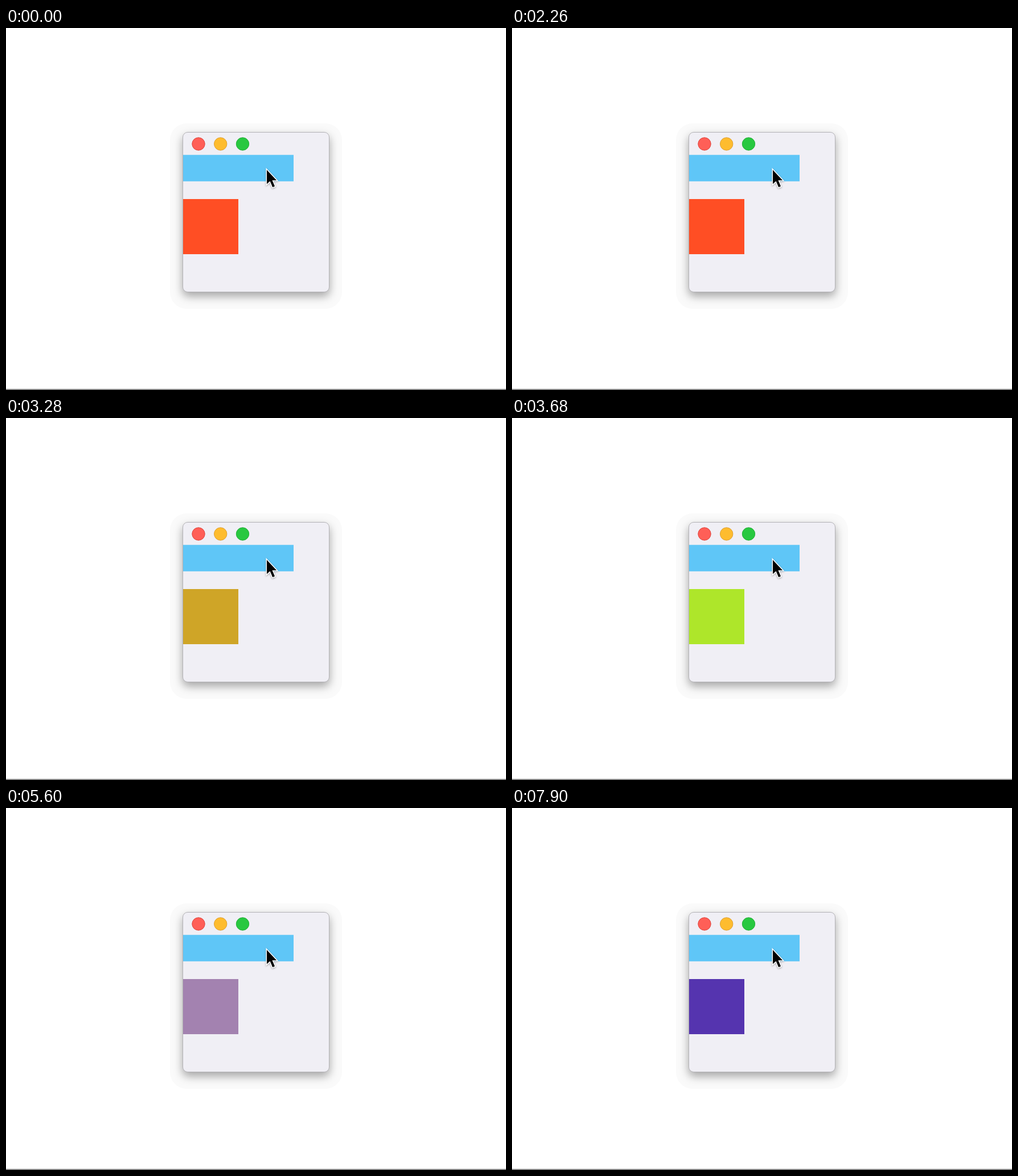
An HTML page for the animation above (8000 ms loop, 878x637 px).

```html
<!DOCTYPE html>
<html lang="en">
<head>
<meta charset="utf-8">
<title>Window with a press bar and a colour square</title>
<style>
  html, body { margin: 0; width: 100%; height: 100%; overflow: hidden; background: #fff; }
  svg { display: block; width: 878px; height: 637px; }
  .window { filter: drop-shadow(0 7px 8px rgba(0, 0, 0, .34)); }
  .cursor { filter: drop-shadow(0 1.5px 1.5px rgba(0, 0, 0, .35)); }
</style>
</head>
<body>
<svg viewBox="0 0 878 637">
  <rect y="635" width="878" height="2" fill="#8c8c8c"/>
  <rect x="288" y="168" width="302" height="326" rx="29" fill="#fafafa"/>
  <rect class="window" x="310.5" y="183.5" width="257" height="281" rx="8.5" fill="#f0eff5" stroke="#b2b1b5"/>
  <g>
    <circle cx="338" cy="204" r="11.2" fill="#ff5f57" stroke="#e0443e"/>
    <circle cx="376.7" cy="204" r="11.2" fill="#febc2e" stroke="#dea034"/>
    <circle cx="415.5" cy="204" r="11.2" fill="#28c840" stroke="#24ae38"/>
  </g>
  <rect id="bar" x="311" y="223.3" width="194" height="46.5" fill="#5fc6f7"/>
  <rect id="square" x="311" y="301" width="97" height="97" fill="#ff4e24"/>
  <path class="cursor" d="M458 249.8V274.6L463.6 269.4 468.2 280.2 472 278.6 467.5 268H475Z"
        fill="#000" stroke="#fff" stroke-width="3" paint-order="stroke"/>
</svg>
<script>
  const LOOP = 8000;
  const IDLE = '#5fc6f7', PRESSED = '#107eff';
  const RED = '#ff4e24', ORANGE = '#ef6424', LIME = '#aee62a';
  const LILAC = '#a065d6', INDIGO = '#5534af';

  // Each row: time in ms, fill, and the easing towards the next row (held by default).
  function play(id, rows) {
    const keyframes = rows.map(([time, fill, easing = 'step-end']) =>
      ({ offset: time / LOOP, fill, easing }));
    const animation = document.getElementById(id)
      .animate(keyframes, { duration: LOOP, iterations: Infinity });
    animation.startTime = document.timeline.currentTime;
  }

  play('bar', [
    [0, IDLE],
    [1300, PRESSED], [2260, IDLE],
    [4080, PRESSED], [4480, IDLE],
    [6320, PRESSED], [6700, IDLE],
    [LOOP, IDLE]
  ]);

  play('square', [
    [0, RED],
    [3100, ORANGE, 'steps(6, jump-end)'],
    [3460, LIME],
    [5320, LIME, 'steps(9, jump-start)'],
    [5725, LILAC],
    [7600, LILAC, 'steps(4, jump-start)'],
    [LOOP, INDIGO]
  ]);
</script>
</body>
</html>
```
